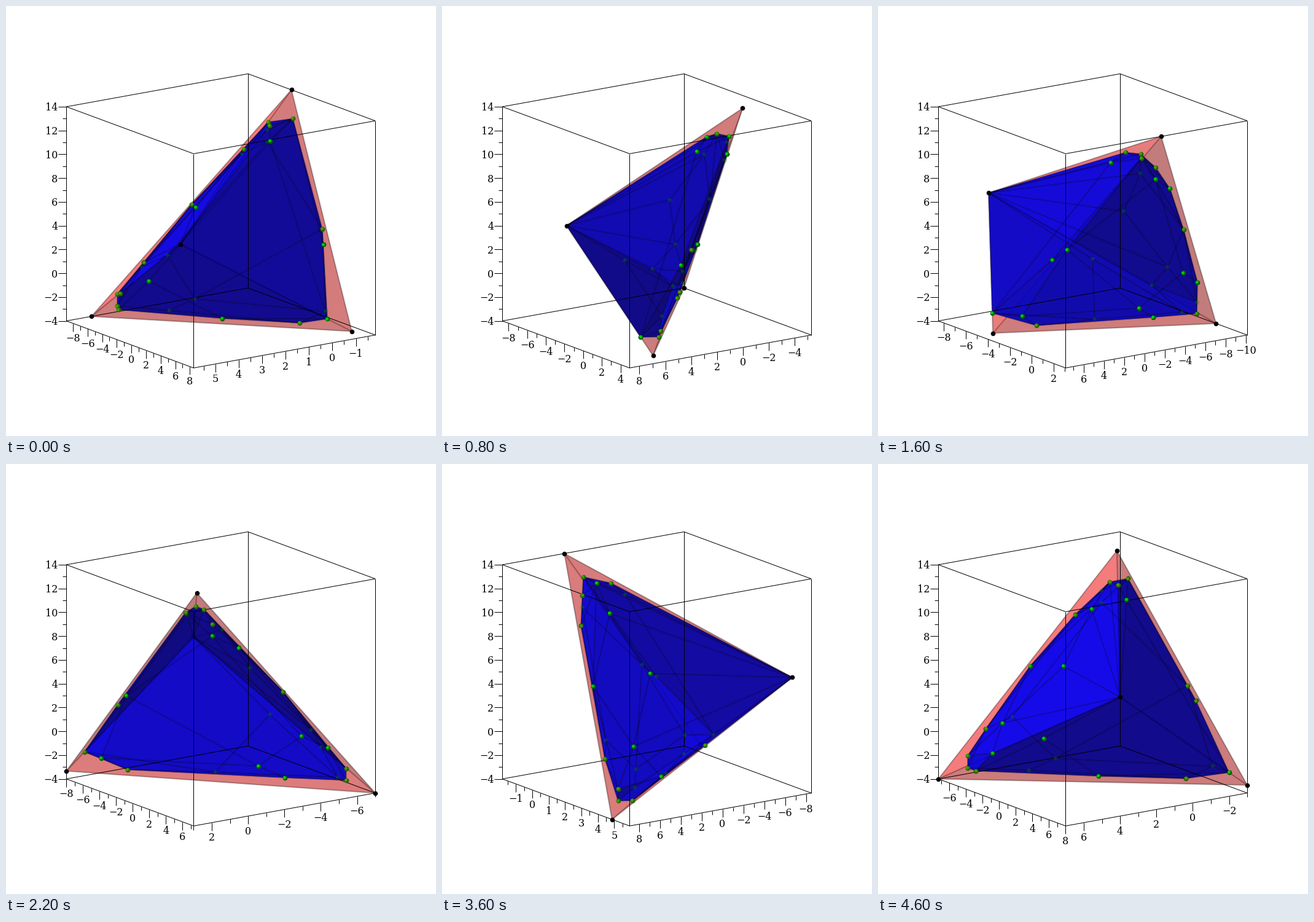
Animation of 700 by 700 pixels, one loop 4.8 s. Source, as a matplotlib script:

```python
from itertools import combinations, product

import matplotlib.pyplot as plt
import numpy as np
from matplotlib.animation import FuncAnimation
from matplotlib.collections import LineCollection, PolyCollection

FRAMES, LOOP_MS = 24, 4800
PX = 0.72  # points per pixel at 100 dpi
SCALE, CENTER = 361, np.array([349.7, 349.8])
LIGHT = np.array([-0.66, 0.56, 0.50])

# Corners of the rational simplex; faces are listed in painting order.
SIMPLEX = np.array([[21, -22, -12], [-9, 24, -10], [12, 24, 18], [-3, -10, 42]]) / 3
FACES = np.array([[0, 1, 3], [0, 2, 3], [1, 2, 3], [0, 1, 2]])

# Rows: screen right, screen up, towards the viewer.
th, ph = np.radians([55, 75])
VIEW = np.array([
    [-np.sin(th), np.cos(th), 0],
    [-np.cos(th) * np.cos(ph), -np.sin(th) * np.cos(ph), np.sin(ph)],
    [np.cos(th) * np.sin(ph), np.sin(th) * np.sin(ph), np.cos(ph)],
])


def unit(v):
    return v / np.linalg.norm(v, axis=-1, keepdims=True) if False else (
        v / np.linalg.norm(v, axis=-1, keepdims=True))


def normals(tri):
    return np.cross(tri[:, 1] - tri[:, 0], tri[:, 2] - tri[:, 0])


def face_outward(points, faces):
    """Order the corners of each triangle counter-clockwise from outside."""
    tri = points[faces]
    out = np.sum(normals(tri) * (tri[:, 0] - points.mean(axis=0)), axis=1)
    return np.array([f if s > 0 else f[::-1] for f, s in zip(faces, out)])


def lattice_points(tri):
    n = normals(tri)
    d = np.sum(n * tri[:, 0], axis=1)
    grid = np.mgrid[-3:8, -8:9, -4:15].reshape(3, -1).T
    return grid[np.all(grid @ n.T <= d + 1e-6, axis=1)]


def drop_midpoints(points):
    """Remove points halfway between two others; they cannot be hull vertices."""
    known = set(map(tuple, points.tolist()))
    steps = [s for s in product(range(-2, 3), repeat=3) if s > (0, 0, 0)]

    def is_mid(p):
        return any(tuple(a + b for a, b in zip(p, s)) in known
                   and tuple(a - b for a, b in zip(p, s)) in known for s in steps)

    return np.array([p for p in sorted(known) if not is_mid(p)])


def convex_hull(points):
    """Exact hull of few integer points: vertices and outward polygons."""
    idx = np.array(list(combinations(range(len(points)), 3)))
    n = normals(points[idx])
    idx, n = idx[n.any(axis=1)], n[n.any(axis=1)]
    side = points @ n.T - np.sum(n * points[idx[:, 0]], axis=1)
    below, above = side.max(axis=0) <= 0, side.min(axis=0) >= 0
    n = np.vstack([n[below], -n[above]])
    n = np.unique(n // np.gcd.reduce(n, axis=1)[:, None], axis=0)
    height = points @ n.T
    on = height == height.max(axis=0)
    keep = on.sum(axis=1) >= 3
    verts, on = points[keep], on[keep]

    rings = []
    for normal, member in zip(n, on.T):
        ids = np.flatnonzero(member)
        rel = verts[ids] - verts[ids].mean(axis=0)
        e1 = unit(rel[0])
        e2 = np.cross(unit(normal.astype(float)), e1)
        rings.append(ids[np.argsort(np.arctan2(rel @ e2, rel @ e1))])
    return verts, rings


FACES = face_outward(SIMPLEX, FACES)
HULL, RINGS = convex_hull(drop_midpoints(lattice_points(SIMPLEX[FACES])))
hull_normals = normals(HULL[[r[:3] for r in RINGS]])
rank = np.argmax(unit(hull_normals) @ unit(normals(SIMPLEX[FACES])).T, axis=1)
RINGS = [RINGS[i] for i in np.argsort(rank, kind="stable")]
TRIS = np.array([r[:3] for r in RINGS])  # one triangle spans each facet's plane
EDGES = np.array(sorted({tuple(sorted(e)) for r in RINGS for e in zip(r, np.roll(r, 1))}))
DOTS = [i for i, p in enumerate(HULL) if not np.allclose(p, SIMPLEX[2])]


def spin(points, angle):
    c, s = np.cos(angle), np.sin(angle)
    x, y, z = points.T
    return np.column_stack([x * c + y * s, y * c - x * s, z])


def brightness(n):
    n = np.where(n[:, 2:] < 0, -n, n)
    return 0.47 + 0.53 * np.clip(n @ LIGHT, 0, 1)


def tint(n, channel, alpha):
    rgba = np.zeros((len(n), 4))
    rgba[:, channel] = brightness(n)
    rgba[:, 3] = alpha
    return rgba


fig = plt.figure(figsize=(7, 7), dpi=100, facecolor="white")
ax = fig.add_axes([0, 0, 1, 1])


def lines(segments, width=1, alpha=1):
    ax.add_collection(LineCollection(segments, colors="black", linewidths=width * PX,
                                     alpha=alpha, zorder=2))


def disc(xy, radius, color, zorder, alpha=1):
    xy = np.reshape(xy, (-1, 2))
    ax.scatter(xy[:, 0], xy[:, 1], s=(2 * radius * PX) ** 2, color=color,
               alpha=alpha, linewidths=0, zorder=zorder)


def ball(xy, red, zorder, alpha=1):
    disc(xy, 3.9, (red * 0.6, 0.38, 0), zorder, alpha)
    disc(xy + [-0.8, -0.8], 2.4, (red, 0.80 - red * 0.7, 0), zorder, alpha)


def axis_ticks(lo, hi, place, shift, **align):
    """Ticks along one box edge, with a short tick between labels."""
    half = 0.5 if hi - lo < 9 else 1
    shift = np.array(shift)
    segments = []
    for k in range(int(np.ceil(lo / half - 1e-6)), int(np.floor(hi / half + 1e-6)) + 1):
        start = place(k * half)
        major = k % 2 == 0
        segments.append([start, start + shift * (13 if major else 6.5)])
        if major:
            gap = 14 if shift[0] else 23
            x, y = start + shift * gap
            label = f"{k * half:.0f}".replace("-", "\u2212")
            ax.text(x, y, label, family="DejaVu Serif", fontsize=16 * PX,
                    va="center_baseline", **align)
    lines(segments)


def draw(frame):
    ax.clear()
    ax.set(xlim=(0, 700), ylim=(700, 0))
    ax.axis("off")

    angle = np.radians(15 * (frame + 1))
    corners = spin(SIMPLEX, angle)
    lo, hi = corners.min(axis=0), corners.max(axis=0)

    def project(points):
        return ((np.asarray(points) - lo) / (hi - lo) - 0.5) @ VIEW.T * SCALE

    def screen(q):
        return CENTER + q[..., :2] * [1, -1]

    outer, inner = project(corners), project(spin(HULL, angle))
    n_out, n_in = unit(normals(outer[FACES])), unit(normals(inner[TRIS]))

    polys = [screen(outer[f]) for f in FACES] + [screen(inner[r]) for r in RINGS]
    fills = np.vstack([tint(n_out, 0, 0.3), tint(n_in, 2, 0.7)])
    edges = [(0, 0, 0, 0.17)] * len(FACES) + [(0, 0, 0, 0)] * len(RINGS)
    ax.add_collection(PolyCollection(polys, facecolors=fills, edgecolors=edges,
                                     linewidths=2 * PX, joinstyle="round", zorder=1))
    lines(screen(inner[EDGES]), width=2, alpha=0.25)

    # Box
    cube = list(product((0, 1), repeat=3))
    ends = [(a, b) for a, b in combinations(cube, 2)
            if sum(i != j for i, j in zip(a, b)) == 1]
    lines(screen(project(lo + np.array(ends) * (hi - lo))))

    axis_ticks(lo[0], hi[0], lambda t: screen(project([t, hi[1], lo[2]])), (0, 1), ha="center")
    axis_ticks(lo[1], hi[1], lambda t: screen(project([hi[0], t, lo[2]])), (0, 1), ha="center")
    axis_ticks(lo[2], hi[2], lambda t: screen(project([hi[0], lo[1], t])), (-1, 0), ha="right")

    # Balls near the red skin poke through it; deeper ones look olive.
    front_ids = {i for r, n in zip(RINGS, n_in) if n[2] > 0 for i in r}
    skin = n_out[:, 2] > 1e-3
    level = np.sum(n_out * outer[FACES[:, 0]], axis=1)
    for i in DOTS:
        xy = screen(inner[i])
        if i in front_ids:
            depth = ((level - n_out @ inner[i])[skin] / n_out[skin, 2]).min()
            ball(xy, 0.0 if depth < 4 else 0.25, 4)
        else:
            ball(xy, 0.0, 3, alpha=0.18)

    front_corners = set(FACES[n_out[:, 2] > 0].ravel())
    for i, q in enumerate(outer):
        disc(screen(q), 3.8, "black", 5 if i in front_corners else 0)
    return []


# Plain vector normalisation, shared by geometry and shading.
anim = FuncAnimation(fig, draw, frames=FRAMES, init_func=lambda: [],
                     interval=LOOP_MS / FRAMES, repeat=True, repeat_delay=0)
plt.show()
```
